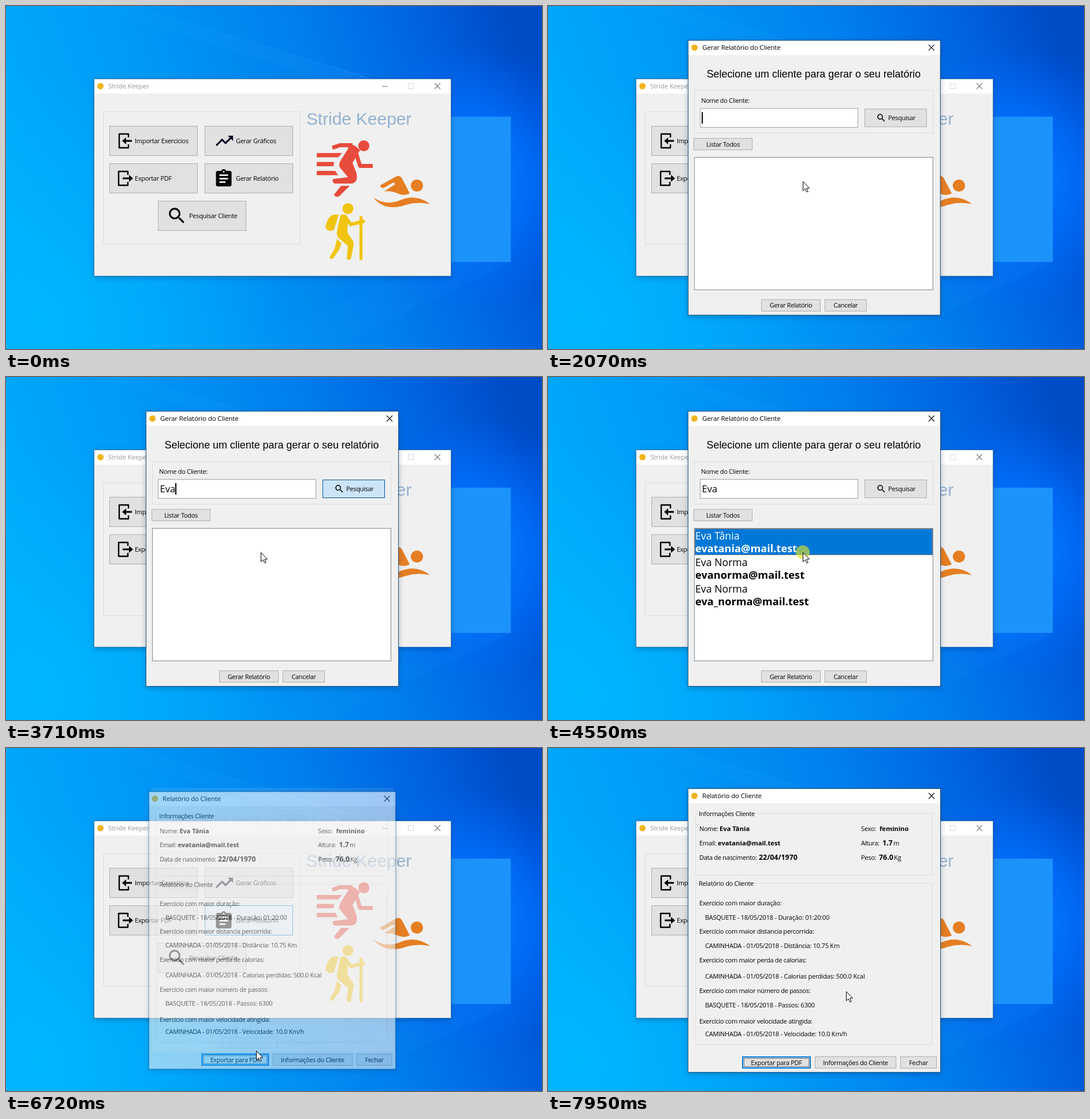
An HTML page for the animation above (8000 ms loop, 928 by 595 pixels).

```html
<!DOCTYPE html>
<html lang="pt">
<head>
<meta charset="utf-8">
<title>Stride Keeper</title>
<style>
html, body { margin: 0; width: 100%; height: 100%; overflow: hidden; background: #0087f3; }
svg { display: block; }
text { font: 11px "Open Sans", "Noto Sans", sans-serif; letter-spacing: -.3px; white-space: pre; }
.title { font-size: 11.6px; letter-spacing: -.17px; }
.arial { font-family: "Liberation Sans", Arial, sans-serif; letter-spacing: 0; }
.wide { letter-spacing: -.22px; }
.bold { font-weight: 700; font-size: 11.2px; letter-spacing: 0; }
.digits { font-weight: 700; font-size: 12.4px; letter-spacing: 0; }
.item { font-size: 17.7px; letter-spacing: 0; }
.mail { font-size: 18.2px; font-weight: 700; letter-spacing: 0; }
.field { font-size: 16.5px; letter-spacing: 0; }
</style>
</head>
<body>
<svg id="stage" width="928" height="595" viewBox="0 0 928 595"></svg>
<script>
const APP = 'Stride Keeper';
const PEOPLE = [
  ['Eva Tânia', 'evatania@mail.test'],
  ['Eva Norma', 'evanorma@mail.test'],
  ['Eva Norma', 'eva_norma@mail.test'],
];
const ICON = {
  search: 'M15.5 14h-.79l-.28-.27C15.41 12.59 16 11.11 16 9.5 16 5.91 13.09 3 9.5 3S3 5.91 3 9.5 5.91 16 9.5 16c1.61 0 3.09-.59 4.23-1.57l.27.28v.79l5 4.99L20.49 19l-4.99-5zm-6 0C7.01 14 5 11.99 5 9.5S7.01 5 9.5 5 14 7.01 14 9.5 11.99 14 9.5 14z',
  chart: 'M16 6l2.29 2.29-4.88 4.88-4-4L2 16.59 3.41 18l6-6 4 4 6.3-6.29L22 12V6z',
  report: 'M19 3h-4.18C14.4 1.84 13.3 1 12 1s-2.4.84-2.82 2H5c-1.1 0-2 .9-2 2v14c0 1.1.9 2 2 2h14c1.1 0 2-.9 2-2V5c0-1.1-.9-2-2-2zm-7 0c.55 0 1 .45 1 1s-.45 1-1 1-1-.45-1-1 .45-1 1-1zm2 14H7v-2h7v2zm3-4H7v-2h10v2zm0-4H7V7h10v2z',
};
const BUTTON = {
  normal: ['#e1e1e1', '#adadad', 1],
  hover: ['#e5f1fb', '#0078d7', 1],
  pressed: ['#cce4f7', '#005499', 1],
  focus: ['#e5f1fb', '#0078d7', 2],
  default: ['#e1e1e1', '#0078d7', 2],
};

const text = (x, y, str, cls = '', attrs = '') =>
  `<text x="${x}" y="${y}" class="${cls}" ${attrs}>${str}</text>`;
const rect = (x, y, w, h, attrs) => `<rect x="${x}" y="${y}" width="${w}" height="${h}" ${attrs}/>`;
const outline = (x, y, w, h, stroke, fill = 'none') =>
  rect(x + .5, y + .5, w - 1, h - 1, `fill="${fill}" stroke="${stroke}"`);
const icon = (name, x, y, scale, fill = '#000') =>
  `<path d="${ICON[name]}" fill="${fill}" transform="translate(${x} ${y}) scale(${scale})"/>`;
const cross = (x, y, color) =>
  `<path d="M${x} ${y}l10 10m0 -10l-10 10" stroke="${color}" stroke-width="1.1"/>`;
const line = (d, width, color) =>
  `<path d="${d}" fill="none" stroke="${color}" stroke-width="${width}" stroke-linejoin="round"/>`;

function button(id, x, y, w, h, label = '', labelX = x + w / 2) {
  const anchor = labelX === x + w / 2 ? 'text-anchor="middle"' : '';
  return `<g id="${id}">${rect(x, y, w, h, '')}${rect(x + 1, y + 1, w - 2, h - 2, '')}
    ${rect(x + 3.5, y + 3.5, w - 7, h - 7, 'class="ring" fill="none" stroke="#111" stroke-dasharray="1 1"')}
    ${text(labelX, y + h / 2 + 4, label, '', anchor)}</g>`;
}

function frame(x, y, w, h, title, color, border) {
  return rect(x - 1, y + 1, w + 2, h + 3, 'fill="#002850" opacity=".3" filter="url(#blur)"') +
    rect(x, y, w, h, 'fill="#f0f0f0"') + rect(x, y, w, 25, 'fill="#fff"') +
    rect(x - .5, y - .5, w + 1, h + 1, `fill="none" stroke="${border}"`) +
    `<circle cx="${x + 10.5}" cy="${y + 12}" r="5.5" fill="#f0b41c"/>` +
    text(x + 24, y + 16, title, 'title', `fill="${color}"`);
}

function wallpaper() {
  return `<defs>
    <filter id="blur" x="-10%" y="-10%" width="120%" height="120%"><feGaussianBlur stdDeviation="5"/></filter>
    <linearGradient id="sky" x1="0" y1=".6" x2="1" y2=".4">
      <stop offset="0" stop-color="#00aefd"/><stop offset=".3" stop-color="#009bf8"/>
      <stop offset=".62" stop-color="#0080ee"/><stop offset=".85" stop-color="#0062df"/>
      <stop offset="1" stop-color="#004cc8"/></linearGradient>
    <radialGradient id="glow" gradientUnits="userSpaceOnUse" cx="800" cy="300" r="230">
      <stop offset="0" stop-color="#0a80ff"/><stop offset=".5" stop-color="#0070ff" stop-opacity=".75"/>
      <stop offset="1" stop-color="#0068ff" stop-opacity="0"/></radialGradient>
    <radialGradient id="corner" gradientUnits="userSpaceOnUse" cx="60" cy="540" r="420">
      <stop offset="0" stop-color="#00baff" stop-opacity=".7"/><stop offset="1" stop-color="#00b4ff" stop-opacity="0"/></radialGradient>
    <linearGradient id="beam"><stop offset="0" stop-color="#2fb0ff" stop-opacity=".1"/>
      <stop offset="1" stop-color="#2f9cff" stop-opacity=".4"/></linearGradient>
    </defs>` +
    ['sky', 'corner', 'glow'].map(g => rect(0, 0, 928, 595, `fill="url(#${g})"`)).join('') +
    `<path d="M215 0L770 168V200L150 0Z" fill="url(#beam)" opacity=".35"/>
     <path d="M215 0L770 168" stroke="url(#beam)" stroke-width="1.5"/>
     <path d="M400 595L770 432L874 445L560 595Z" fill="url(#beam)" opacity=".2"/>` +
    rect(622, 192, 252, 252, 'fill="#1c92fb"');
}

function pictograms() {
  const red = '#e74c3c', orange = '#e67e22', yellow = '#f1c40f';
  return `<g fill="${red}"><circle cx="619.5" cy="242.5" r="9.6"/>
      <path d="M538 255h44l-7 7.500h-37zM538 270.500h30l-1 7.500h-29zM538 286h32l5 7.500h-37z"/>
      <path d="M594 238L605 243 613 250 600 272 606 288Q609 296 606 304L600 308H569Q563 304 567 300L592 297 578 280Q575 274 580 267L592 248Z"/>
      <path d="M580 312H595L577 330Q570 333 568 327Z"/></g>
    ${line('M565 246L578 241.500 600 241.500', 7, red)}${line('M605 252L613 277.500H635', 7, red)}
    <g fill="${orange}"><circle cx="711.5" cy="311.5" r="10.6"/>
      <path d="M648 311L676 295.500Q681 293 685 298L699 325Q690 330 680 326 668 320 655 321.500L674 309 671 306 654 315.500Q648 316 648 311Z"/>
      <path d="M636 332Q657 347 682 337 710 325 734 343.500 712 339 694 344.500 656 358 636 332Z"/></g>
    <g fill="${yellow}"><circle cx="592" cy="351.5" r="9.6"/>
      <path d="M553 384Q556 366 567 362L576 362 568 388Q559 394 553 384Z"/>
      <path d="M579 363Q587 359 592 366L591 393 601 408Q603 413 601 419L597 439Q593 442 590 438L592 416 575 402Q571 397 574 387Z"/>
      <path d="M573 404L581 412 577 422 567 437Q562 441 560 436L569 421Z"/>
      <rect x="612" y="364" width="5.300" height="77" rx="2"/></g>
    ${line('M588 367L597 379 621 373', 6, yellow)}`;
}

function mainWindow() {
  const door = (x, y) => line(`M${x + 17} ${y + 6}v-6h-16v24h16v-6`, 2.4, '#000');
  return frame(153, 127, 617, 341, APP, '#999', '#4a7fae') +
    '<path d="M651 139.500h10" stroke="#777"/>' + outline(696, 134, 10, 10, '#d8d8d8') + cross(742, 134, '#777') +
    outline(168, 183, 342, 231, '#dcdcdc') +
    button('import', 179, 208, 153, 52, 'Importar Exercícios', 223) +
    button('charts', 344, 208, 153, 52, 'Gerar Gráficos', 398) +
    button('export', 179, 273, 153, 52, 'Exportar PDF', 223) +
    button('report', 344, 273, 153, 52, 'Gerar Relatório', 398) +
    button('find', 263, 338, 153, 52, 'Pesquisar Cliente', 317) +
    door(195, 222) + '<path d="M201 234l7-6v4.500h10v3h-10v4.500z"/>' +
    door(194, 287) + '<path d="M220 299l-7-6v4.500h-11v3h11v4.500z"/>' +
    icon('chart', 360, 216, 1.5, '#000022') + icon('report', 359, 281.5, 1.5) + icon('search', 277.5, 345.5, 1.53) +
    text(520, 206, APP, 'arial', 'style="font-size:29.8px" fill="#94b1d1"') + pictograms();
}

function searchDialog() {
  const rows = PEOPLE.map(([name, mail], i) => {
    const y = 282 + i * 46;
    return `<g class="row">${text(255, y, name, 'item')}${text(255, y + 22, mail, 'mail')}</g>`;
  }).join('');
  return frame(243, 60, 436, 476, 'Gerar Relatório do Cliente', '#000', '#24567f') + cross(659, 67, '#000') +
    text(274.5, 124, 'Selecione um cliente para gerar o seu relatório', 'arial', 'style="font-size:17.9px"') +
    outline(253, 146, 414, 75, '#dcdcdc') + text(265, 168, 'Nome do Cliente:') +
    outline(263, 177, 274, 34, '#a0a0a0', '#fff') + text(266.5, 200, '', 'field', 'id="typed"') +
    rect(266, 184, 2, 20, 'id="caret"') +
    button('lookup', 548, 178, 108, 32, 'Pesquisar', 589) + icon('search', 568, 185, .75) +
    button('all', 252, 229, 102, 21, 'Listar Todos') +
    outline(253, 262, 414, 231, '#828790', '#fff') +
    `<g id="results">${rect(254, 263, 412, 46, 'id="selected" fill="#0078d7"')}
     ${rect(254.5, 263.5, 411, 45, 'id="rowFocus" fill="none" stroke="#ff8728" stroke-dasharray="1 1"')}${rows}</g>` +
    button('generate', 369, 509, 103, 21, 'Gerar Relatório') + button('cancel', 479, 509, 73, 21, 'Cancelar');
}

function reportDialog() {
  const group = (y, h, label, gap) => outline(255, y, 410, h, '#dcdcdc') +
    rect(259, y - 2, gap, 5, 'fill="#f0f0f0"') + text(261, y + 5, label);
  const details = [
    ['duração', 273, 'BASQUETE - 18/05/2018 - Duração: 01:20:00', 298],
    ['distancia percorrida', 322, 'CAMINHADA - 01/05/2018 - Distância: 10.75 Km', 347],
    ['perda de calorias', 372, 'CAMINHADA - 01/05/2018 - Calorias perdidas: 500.0 Kcal', 400],
    ['número de passos', 425, 'BASQUETE - 18/05/2018 - Passos: 6300', 450],
    ['velocidade atingida', 478, 'CAMINHADA - 01/05/2018 - Velocidade: 10.0 Km/h', 500],
  ].map(([what, y, value, valueY]) =>
    text(262, y, `Exercício com maior ${what}:`) + text(272, valueY, value, 'wide')).join('');
  return frame(243, 71, 436, 491, 'Relatório do Cliente', '#000', '#24567f') + cross(659, 78, '#000') +
    group(113, 108, 'Informações Cliente', 101) + group(234, 281, 'Relatório do Cliente', 99) +
    text(262, 144, 'Nome:') + text(297, 144, PEOPLE[0][0], 'bold') +
    text(262, 169, 'Email:') + text(294, 169, PEOPLE[0][1], 'bold') +
    text(262, 194, 'Data de nascimento:') + text(365, 194, '22/04/1970', 'digits') +
    text(542, 144, 'Sexo:') + text(574, 144, 'feminino', 'bold') +
    text(542, 169, 'Altura:') + text(579, 169, '1.7', 'digits') + text(598, 169, 'm') +
    text(542, 194, 'Peso:') + text(573, 194, '76.0', 'digits') + text(599, 194, 'Kg') + details +
    button('savePdf', 336, 535, 119, 21, 'Exportar para PDF') +
    button('info', 462, 535, 141, 21, 'Informações do Cliente') + button('close', 610, 535, 63, 21, 'Fechar');
}

const $ = id => document.getElementById(id);
$('stage').innerHTML = wallpaper() + mainWindow() +
  `<g id="searchDialog">${searchDialog()}</g><g id="reportDialog">${reportDialog()}</g>
   <g id="cursor"><circle id="halo" r="12" fill="#f0ea1e" opacity=".6"/>
   <path d="M.5 .5V16.500L4.200 13 6.800 18.700 9.200 17.600 6.700 12H11.500Z" fill="#fff" stroke="#000"/></g>`;

const clamp = v => Math.max(0, Math.min(1, v));
const mix = (a, b, u) => a + (b - a) * u;
const smooth = u => u * u * (3 - 2 * u);
const within = (t, a, b) => t >= a && t < b;
const show = (id, on) => $(id).setAttribute('visibility', on ? 'inherit' : 'hidden');

// The border is the outer box showing around the inset face, so it never spills outside.
function setButton(id, state) {
  const [fill, stroke, width] = BUTTON[state];
  const [border, face, ring] = $(id).children;
  border.setAttribute('fill', stroke);
  face.setAttribute('fill', fill);
  face.setAttribute('stroke', stroke);
  face.setAttribute('stroke-width', (width - 1) * 2);
  ring.setAttribute('visibility', width > 1 ? 'inherit' : 'hidden');
}

function setDialog(id, cy, scale, opacity) {
  $(id).setAttribute('transform', `translate(461 ${cy}) scale(${scale}) translate(-461 ${-cy})`);
  $(id).setAttribute('opacity', clamp(opacity));
  $(id).setAttribute('display', opacity > 0 ? 'inline' : 'none');
}
const opening = (t, start) => {
  const u = clamp((t - start) / 250);
  return [1 - .1 * (1 - u) ** 3, u * 1.45];
};

// The pointer advances in discrete steps of about 77 ms.
const tick = (t, start) => Math.floor((t - start + 1) / 77);

function pointer(t) {
  if (t < 5090) {
    const rest = 1 - clamp(tick(t, 750) / 10);
    return [441 + 405 * rest ** 3.07, 304 + 290 * rest ** 2.07];
  }
  if (t < 7560) {
    const u = smooth(clamp((tick(t, 5090) + 1) / 11));
    return [mix(441, 433, u), mix(304, 525, u)];
  }
  const u = smooth(clamp((tick(t, 7560) + 1) / 6));
  return [mix(433, 516, u), mix(525, 422, u)];
}

function render(t) {
  const [x, y] = pointer(t);
  $('cursor').setAttribute('transform', `translate(${Math.round(x)} ${Math.round(y)})`);
  show('cursor', t >= 750);
  show('halo', within(t, 1600, 1910) || within(t, 4550, 4630) || within(t, 5940, 6540));

  setButton('report', within(t, 1600, 1910) ? 'pressed' : t >= 750 && y < 325 || t > 1910 ? 'hover' : 'normal');

  if (t < 6600) setDialog('searchDialog', 298, ...opening(t, 1870));
  else {
    const u = (t - 6600) / 150;
    setDialog('searchDialog', 298, 1 - .046 * u, 1 - 1.12 * u);
  }
  setDialog('reportDialog', 316.5, ...opening(t, 6620));

  $('typed').textContent = 'Eva'.slice(0, (t >= 3010) + (t >= 3160) + (t >= 3240));
  const typedWidth = t >= 3010 ? $('typed').getComputedTextLength() : 0;
  $('caret').setAttribute('x', Math.round(266 + typedWidth));
  show('caret', t < 2530 || within(t, 3010, 3780) || within(t, 4230, 4550));
  setButton('lookup', within(t, 3710, 3850) ? 'pressed' : 'normal');

  show('results', within(t, 3850, 6600));
  show('selected', t >= 4550);
  show('rowFocus', within(t, 4550, 6470));
  document.querySelector('.row').setAttribute('fill', t >= 4550 ? '#fff' : '#000');

  setButton('generate', t >= 6470 ? 'focus' : t >= 5940 ? 'pressed' : t >= 5090 && y >= 509 ? 'hover' : 'normal');
  setButton('savePdf', t < 7370 ? 'focus' : 'default');
}

['import', 'charts', 'export', 'find', 'all', 'cancel', 'info', 'close'].forEach(id => setButton(id, 'normal'));

const origin = performance.now();
function loop() {
  render((performance.now() - origin) % 8000);
  requestAnimationFrame(loop);
}
render(0);
requestAnimationFrame(loop);
</script>
</body>
</html>
```
